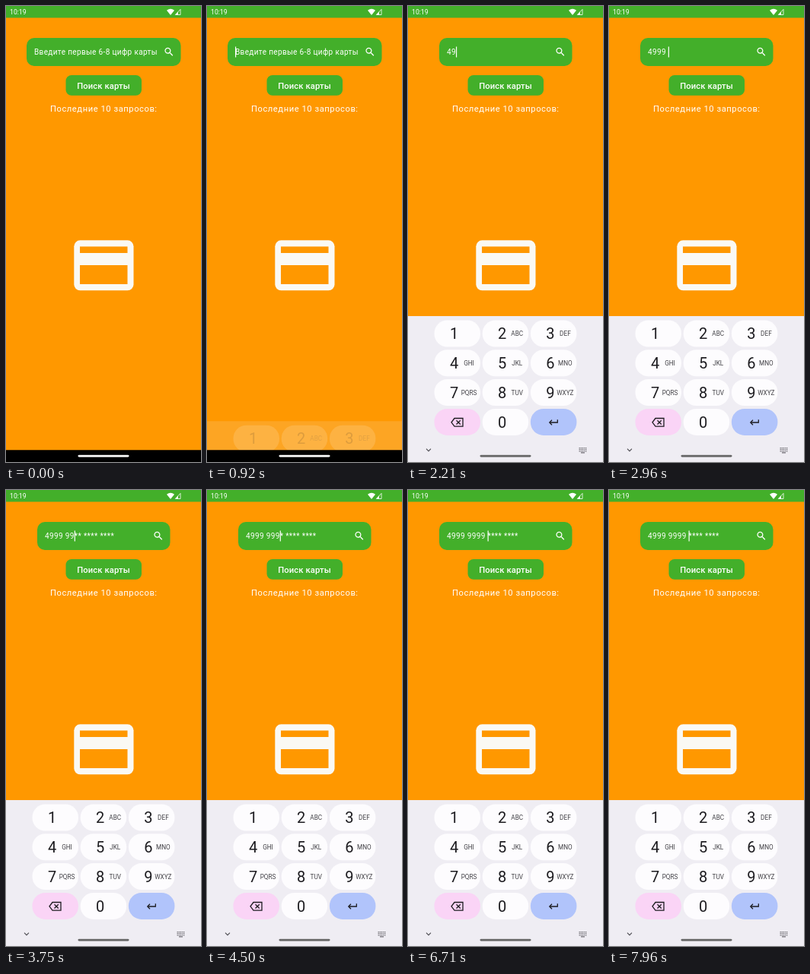
Recreate the animation shown at these times as an HTML page with a canvas. Size 256 by 600 pixels, loop 8 s.

```html
<!DOCTYPE html>
<html lang="ru">
<head>
<meta charset="utf-8">
<title>Поиск карты</title>
<style>
html, body { margin: 0; width: 100%; height: 100%; overflow: hidden; background: #ff9800; }
canvas { display: block; width: 256px; height: 600px; }
</style>
</head>
<body>
<canvas id="stage"></canvas>
<script>
const LOOP = 8000;
const FOCUS = 750;
const KEY_TIMES = [1900, 2160, 2430, 2700, 3200, 3700, 4250, 4600];
const DIGITS = '49999999';
const SLIDE = { start: 860, length: 310 };
const KEYBOARD_TOP = 408;

const GREEN = '#43af2a', ORANGE = '#ff9800', PANEL = '#efedf3', INK = '#1d1c20';
const SEARCH = new Path2D('M15.5 14h-.79l-.28-.27C15.41 12.59 16 11.11 16 9.5 16 5.91 13.09 3 9.5 3S3 5.91 3 9.5 5.91 16 9.5 16c1.61 0 3.09-.59 4.23-1.57l.27.28v.79l5 4.99L20.49 19l-4.99-5zm-6 0C7.01 14 5 11.99 5 9.5S7.01 5 9.5 5 14 7.01 14 9.5 11.99 14 9.5 14z');
const LETTERS = ['', 'ABC', 'DEF', 'GHI', 'JKL', 'MNO', 'PQRS', 'TUV', 'WXYZ'];

const canvas = document.getElementById('stage');
const ctx = canvas.getContext('2d');
const ratio = window.devicePixelRatio || 1;
canvas.width = 256 * ratio;
canvas.height = 600 * ratio;

const clamp = v => Math.max(0, Math.min(1, v));

function box(x, y, w, h, r, color) {
  ctx.fillStyle = color;
  ctx.beginPath();
  ctx.roundRect(x, y, w, h, r);
  ctx.fill();
}

function text(str, x, y, size, { color = '#fff', weight = 400, align = 'left', spacing = 0 } = {}) {
  ctx.font = `${weight} ${size}px Roboto, sans-serif`;
  ctx.letterSpacing = spacing + 'px';
  ctx.textAlign = align;
  ctx.fillStyle = color;
  ctx.fillText(str, x, y);
}

function line(points, width, color) {
  ctx.strokeStyle = color;
  ctx.lineWidth = width;
  ctx.beginPath();
  points.forEach(([x, y]) => ctx.lineTo(x, y));
  ctx.stroke();
}

function statusBar() {
  box(0, 0, 256, 15.5, 0, GREEN);
  text('10:19', 5, 11.3, 8.7);
  ctx.beginPath();
  ctx.moveTo(216, 12);
  ctx.lineTo(211, 5.8);
  ctx.quadraticCurveTo(216, 1.8, 221, 5.8);
  ctx.fill();
  ctx.beginPath();
  ctx.moveTo(222.3, 11.5);
  ctx.lineTo(229, 4.4);
  ctx.lineTo(229, 11.5);
  ctx.closePath();
  ctx.strokeStyle = '#fff';
  ctx.lineWidth = 0.8;
  ctx.stroke();
  ctx.beginPath();
  ctx.moveTo(222.3, 11.5);
  ctx.lineTo(226, 7.6);
  ctx.lineTo(226, 11.5);
  ctx.fill();
}

// Groups of four; the rest of the number is masked from the sixth digit on.
function cardText(count) {
  const typed = DIGITS.slice(0, count);
  const group = s => s.replace(/(.{4})(?=.)/g, '$1 ');
  const head = group(typed) + (count === 4 || count === 8 ? ' ' : '');
  return { head, full: count < 6 ? head : group(typed.padEnd(16, '*')) };
}

function field(t) {
  const count = KEY_TIMES.filter(k => k <= t).length;
  const inset = count ? 14 : 0;
  const style = { spacing: 0.36 };
  const x = 37 + inset;
  const { head, full } = cardText(count);
  box(27 + inset, 42, 202.5 - 2 * inset, 37, 10, GREEN);
  text(count ? full : 'Введите первые 6-8 цифр карты', x, 64.3, 10, style);

  const since = t - (count ? KEY_TIMES[count - 1] : FOCUS);
  if (since >= 0 && since % 1000 < 500) {
    const width = ctx.measureText(head).width;
    box(x + width, 53.5, 1.2, 14, 0, '#fff');
  }

  ctx.save();
  ctx.translate(206.5 - inset, 52.9);
  ctx.scale(0.623, 0.623);
  ctx.fillStyle = '#fff';
  ctx.fill(SEARCH);
  ctx.restore();
}

function cardIcon() {
  box(89.3, 308.3, 78.2, 66, 8, '#faf9f4');
  box(97, 316.5, 62.5, 8.5, 0, ORANGE);
  box(97, 341, 62.5, 25, 0, ORANGE);
}

function eraseIcon() {
  line([[57, 547.8], [61, 542.5], [72, 542.5], [72, 553.2], [61, 553.2], [57, 547.8], [61, 542.5]], 1.3, INK);
  line([[63.5, 545.2], [68.8, 550.5]], 1.3, INK);
  line([[68.8, 545.2], [63.5, 550.5]], 1.3, INK);
}

function enterIcon() {
  line([[196.3, 544.3], [196.3, 548], [186, 548]], 1.3, INK);
  line([[189, 544.8], [185.8, 548], [189, 551.2]], 1.3, INK);
}

function keyboard() {
  box(0, KEYBOARD_TOP, 256, 192, 0, PANEL);
  for (let i = 0; i < 12; i++) {
    const x = 34.5 + (i % 3) * 63.2;
    const y = 413.5 + Math.floor(i / 3) * 38.8;
    const color = i === 9 ? '#fad4f6' : i === 11 ? '#b1c4fb' : '#fdfcfe';
    box(x, y, 60.5, 35, 17, color);
    if (i === 9 || i === 11) continue;
    text(i === 10 ? '0' : String(i + 1), x + 26, y + 24.7, 20, { color: INK, weight: 400, align: 'center' });
    if (LETTERS[i]) text(LETTERS[i], x + 45.5, y + 20.7, 8.2, { color: '#434247', align: 'center' });
  }
  eraseIcon();
  enterIcon();
  line([[24, 582.7], [27, 585.7], [30, 582.7]], 1.1, '#4c4b50');
  for (let row = 0; row < 3; row++) {
    for (let col = 0; col < 5; col++) {
      box(224.6 + col * 2.1, 581 + row * 2.1, 1.2, 1.2, 0, '#5d5c62');
    }
  }
  box(227, 587.3, 5, 1.1, 0, '#5d5c62');
}

function draw(t) {
  ctx.setTransform(ratio, 0, 0, ratio, 0, 0);
  box(0, 0, 256, 600, 0, ORANGE);
  statusBar();
  field(t);
  box(78.5, 91, 99.5, 26.8, 7.5, GREEN);
  text('Поиск карты', 128, 108.6, 11.2, { weight: 500, align: 'center', spacing: 0.1 });
  text('Последние 10 запросов:', 128.3, 139, 11.2, { align: 'center', spacing: 0.55 });
  cardIcon();

  const p = clamp((t - SLIDE.start) / SLIDE.length);
  if (p > 0) {
    ctx.save();
    ctx.globalAlpha = Math.pow(p, 1.2);
    ctx.translate(0, 192 * Math.pow(1 - p, 1.5));
    keyboard();
    ctx.restore();
  }

  ctx.globalAlpha = 1 - clamp((t - 930) / 240);
  box(0, 584.3, 256, 15.7, 0, '#000');
  ctx.globalAlpha = 1;
  const shade = 255 - 55 * clamp((t - 930) / 360) - 100 * clamp((t - 1290) / 300);
  box(94.5, 590.7, 67, 2.7, 1.35, `rgb(${shade}, ${shade}, ${shade})`);
}

function tick() {
  draw(performance.now() % LOOP);
  requestAnimationFrame(tick);
}
tick();
</script>
</body>
</html>
```
